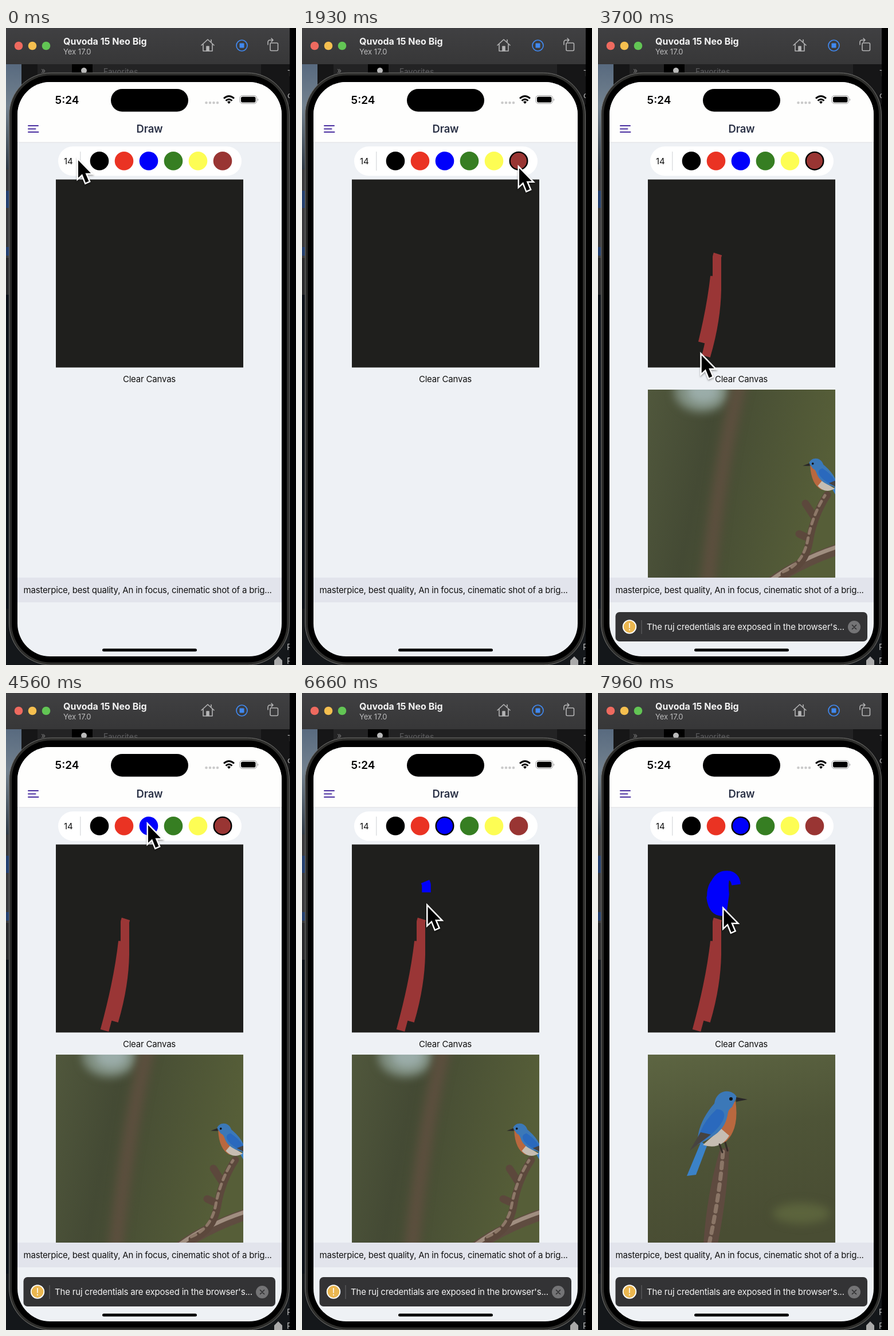
Write an HTML page that moves like this. It is 506x1108 px and loops after 8 s.

```html
<!DOCTYPE html>
<html lang="en">
<head>
<meta charset="utf-8">
<title>Draw</title>
<style>
  html, body { margin: 0; width: 100%; height: 100%; overflow: hidden; background: #000; }
  svg { display: block; width: 506px; height: 1108px; }
  text { font-family: Inter, Roboto, sans-serif; }
  .ui { font-size: 15px; letter-spacing: -.19px; fill: #111; }
  .mid { text-anchor: middle; }
  .line { fill: none; stroke-linecap: round; stroke-linejoin: round; }
  .pen { fill: none; stroke-linejoin: bevel; }
  .soft { filter: blur(8px); }
  #cursor { filter: drop-shadow(0 2px 1.5px rgba(0, 0, 0, .35)); }
</style>
</head>
<body>
<svg viewBox="0 0 506 1108">
  <defs>
    <linearGradient id="bar" x2="0" y2="1">
      <stop stop-color="#404042"/><stop offset="1" stop-color="#373738"/>
    </linearGradient>
    <linearGradient id="sky" x2="0" y2="1">
      <stop stop-color="#586a7f"/><stop offset=".4" stop-color="#73828f"/><stop offset="1" stop-color="#2f3944"/>
    </linearGradient>
    <linearGradient id="grove" x2="1" y2=".2">
      <stop stop-color="#50573c"/><stop offset=".35" stop-color="#444a34"/><stop offset="1" stop-color="#565e38"/>
    </linearGradient>
    <linearGradient id="meadow" x2=".2" y2="1">
      <stop stop-color="#5d6542"/><stop offset=".5" stop-color="#4e5437"/><stop offset="1" stop-color="#494d33"/>
    </linearGradient>
    <clipPath id="screen"><rect x="20" y="94" width="461" height="999" rx="57"/></clipPath>
    <clipPath id="board"><rect x="87" y="264" width="327" height="326"/></clipPath>
    <clipPath id="photo"><rect x="87" y="629" width="327" height="327"/></clipPath>

    <!-- bird facing right, centred on its head -->
    <g id="bird">
      <path d="M-45 74L-35 82L-54 132L-70 134Z" fill="#3b82c8"/>
      <path d="M15 4Q22 55-4 76H-30L5 10Z" fill="#b9683f"/>
      <path d="M4 64Q-12 90-42 80L-10 52Z" fill="#c6bdb2"/>
      <path d="M-22 8C-18-18 10-18 17-3L9 14Q2 18 1 28C-4 56-24 66-52 80Q-52 42-22 8Z" fill="#3b78b8"/>
      <path d="M-18 18C4 18 2 45-52 80Q-48 45-18 18Z" fill="#2a69bd"/>
      <path d="M-65 90L-46 58L-28 62Z" fill="#474340"/>
      <path d="M16-3L36 1L16 5Z" fill="#292728"/>
      <circle cx="7" r="3" fill="#101216"/>
    </g>
  </defs>

  <!-- desktop behind the phone -->
  <rect width="506" height="1108" fill="#050607"/>
  <rect y="63" width="27" height="183" fill="url(#sky)"/>
  <rect x="27" y="63" width="468" height="70" fill="#161617"/>
  <rect x="55" y="63" width="390" height="20" fill="#232324"/>
  <rect x="115" y="63" width="36" height="20" fill="#000"/>
  <circle cx="136" cy="74" r="5" fill="#bbb"/>
  <text x="61" y="79" font-size="14" fill="#777">»</text>
  <text x="170" y="81" font-size="14" fill="#5e5e60">Favorites</text>
  <rect y="246" width="6" height="154" fill="#3a3a3c"/>
  <path d="M0 283H6V313H0ZM0 381H6V396H0Z" fill="#24406f"/>
  <rect y="400" width="6" height="64" fill="#29292b"/>
  <rect y="464" width="6" height="546" fill="#0b1017"/>
  <path d="M0 1010H495V1108H0Z" fill="#14171a"/>
  <g font-size="14" fill="#bbb">
    <text x="491" y="84">T</text><text x="491" y="122">c</text>
    <text x="490" y="1082">P</text><text x="490" y="1106">P</text>
  </g>
  <path d="M468 1100L475 1093L482 1100V1108H468Z" fill="#aaa"/>
  <rect x="495" width="11" height="1108" fill="#000"/>

  <!-- simulator title bar -->
  <rect width="495" height="63" fill="url(#bar)"/>
  <circle cx="22" cy="31" r="7.3" fill="#ee6a5f"/>
  <circle cx="46" cy="31" r="7.3" fill="#f5bf4f"/>
  <circle cx="70" cy="31" r="7.3" fill="#62c554"/>
  <text x="100" y="29" font-size="16" font-weight="700" fill="#f3f3f3">Quvoda 15 Neo Big</text>
  <text x="100" y="46" font-size="13" fill="#bdbdbe">Yex 17.0</text>
  <g class="line" stroke="#b4b4b5" stroke-width="1.6">
    <path d="M341 30L352 20L363 30M344 28V40H360V28M358 24V20.5"/>
    <path d="M350 40V32H354V40" fill="#b4b4b5"/>
    <rect x="461" y="26" width="13.5" height="13.5" rx="2"/>
    <path d="M457 29V25Q457 21 461 21H466M463 18L466 21L463 24"/>
  </g>
  <circle cx="411.5" cy="30.5" r="9.5" fill="none" stroke="#4189f0" stroke-width="1.7"/>
  <rect x="407.5" y="26.5" width="8" height="8" rx="1" fill="#4189f0"/>

  <!-- phone body -->
  <rect x="5.5" y="78" width="489" height="1030" rx="73" fill="#2d2d2b" stroke="#737371"/>
  <rect x="10" y="82.5" width="480" height="1021" rx="68" fill="#000"/>

  <g clip-path="url(#screen)">
    <rect x="20" y="94" width="461" height="999" fill="#eef1f5"/>
    <rect x="20" y="94" width="461" height="105" fill="#fefefd"/>
    <rect x="20" y="198.5" width="461" height="1" fill="#dfe0e2"/>
    <text class="mid" x="106.5" y="132" font-size="19" font-weight="600">5:24</text>
    <rect x="183" y="106" width="135" height="39.5" rx="19.7" fill="#000"/>
    <path class="line" d="M349.5 130H370" stroke="#cbcbcb" stroke-width="4.6" stroke-dasharray="0 6.5"/>
    <path d="M380 122.5Q389 114.5 398 122.5M383.5 126.5Q389 121.5 394.5 126.5" fill="none" stroke="#000" stroke-width="3"/>
    <path d="M386 128.5Q389 126 392 128.5L389 132Z"/>
    <rect x="408" y="117.5" width="29.5" height="14" rx="4.5" fill="none" stroke="#9b9b9b"/>
    <rect x="410" y="119.5" width="25.5" height="10" rx="2.8"/>
    <path d="M439 122.5Q441.5 124.5 439 127Z" fill="#9b9b9b"/>
    <path class="line" d="M39 170H56M39 175.5H51.5M39 181H56.5" stroke="#4a2fa0" stroke-width="2"/>
    <text class="mid" x="250.5" y="182" font-size="18.5" font-weight="600" letter-spacing="-.2" fill="#2a3146">Draw</text>

    <rect x="91" y="206" width="320" height="51" rx="25.5" fill="#fff"/>
    <text class="ui" x="101" y="236.5">14</text>
    <rect x="129" y="215" width="1.5" height="33" fill="#dedfe1"/>
    <g id="swatches"></g>

    <rect x="87" y="263.5" width="327" height="327" fill="#1f1f1d"/>
    <g clip-path="url(#board)">
      <path class="pen" id="trunk" pathLength="1" stroke="#9a3636" stroke-width="15"
        d="M209 393L207.5 398V455Q206.5 510 188.5 571Q206 505 203.5 432Q196 500 172 587"/>
      <path class="pen" id="head" pathLength="1" stroke="#0000fb" stroke-width="15.5"
        d="M215 328L217 333V378A19 27 0 0 1 205 330Q212 316 226 317T241 333Q238 317 226 317Q218 320 221 350L217 380Q200 380 197 355Q210 335 211 350L217 371"/>
    </g>
    <text class="ui mid" x="250" y="615.5">Clear Canvas</text>

    <g id="edgeBird" clip-path="url(#photo)">
      <rect x="87" y="629" width="327" height="327" fill="url(#grove)"/>
      <ellipse class="soft" cx="181" cy="632" rx="48" ry="36" fill="#7f8e80"/>
      <ellipse class="soft" cx="184" cy="632" rx="28" ry="20" fill="#9bada9"/>
      <path class="pen soft" d="M250 610Q215 740 190 980" stroke="#5c4f3e" stroke-width="25"/>
      <g class="line">
        <path d="M300 966Q350 930 418 907" stroke="#5f4c40" stroke-width="19"/>
        <path d="M302 960Q350 925 416 903" stroke="#a08e80" stroke-width="7"/>
        <path d="M325 950Q362 935 369 892T400 812M362 885L351 880M377 850L362 827" stroke="#5c483c" stroke-width="13"/>
        <path d="M323 946Q358 932 366 890T396 813" stroke="#8d7868" stroke-width="5" stroke-dasharray="9 8"/>
      </g>
      <use href="#bird" transform="translate(379 757) scale(-.62 .62) rotate(10)"/>
    </g>

    <g id="perchBird" clip-path="url(#photo)">
      <rect x="87" y="629" width="327" height="327" fill="url(#meadow)"/>
      <ellipse class="soft" cx="355" cy="905" rx="50" ry="18" fill="#5c643d"/>
      <path d="M213 793L229 790Q227 865 209 958H184Q190 870 213 793Z" fill="#5e4a3f"/>
      <path class="line" d="M218 798Q213 870 194 958" stroke="#8a7566" stroke-width="7" stroke-dasharray="10 9"/>
      <use href="#bird" x="225" y="706"/>
      <path class="line" d="M212 785L217 799M222 782L226 796" stroke="#352c28" stroke-width="3"/>
    </g>

    <rect x="20" y="956" width="461" height="43" fill="#e2e4ec"/>
    <text class="ui" x="30.5" y="983">masterpice, best quality, An in focus, cinematic shot of a brig...</text>

    <g id="toast">
      <rect x="30.5" y="1016" width="439.5" height="51" rx="7" fill="#333335"/>
      <circle cx="55" cy="1041.5" r="11.3" fill="#ebb750" stroke="#fff" stroke-width="1.8"/>
      <text class="mid" x="55" y="1047.5" font-size="17" fill="#fff">!</text>
      <rect x="75.5" y="1030" width="1" height="24" fill="#68686a"/>
      <text class="ui" x="85" y="1047" style="fill:#f4f4f4">The ruj credentials are exposed in the browser's...</text>
      <circle cx="447" cy="1042" r="11" fill="#747476"/>
      <path class="line" d="M443.5 1038.5l7 7m0-7l-7 7" stroke="#2f2f31" stroke-width="1.7"/>
    </g>
    <rect x="168" y="1079.5" width="165" height="5" rx="2.5"/>
  </g>

  <path id="cursor" d="M2.5 6V36.5L9.5 30L15.5 45L21 42.5L15 28.5H24.5Z" stroke="#fff" stroke-width="5" paint-order="stroke"/>
</svg>

<script>
const LOOP = 8000;
const $ = id => document.getElementById(id);
const clamp = k => Math.min(1, Math.max(0, k));
const linear = k => k;
const smooth = k => k * k * (3 - 2 * k);

function make(tag, attrs) {
  const node = document.createElementNS("http://www.w3.org/2000/svg", tag);
  for (const name in attrs) node.setAttribute(name, attrs[name]);
  return node;
}

const glide = (from, to, d) => ({ from, to, ease: smooth, path: make("path", { d }) });
const stroke = (from, to, id, lag) => ({ from, to, lag, ease: linear, path: $(id) });

// the pointer rests at the end of each move until the next one begins
const trunk = stroke(2600, 3760, "trunk", 40);
const head = stroke(6500, 7900, "head", 80);
const moves = [
  glide(25, 100, "M123.5 224L234 377"),
  glide(260, 1030, "M234 377C290 330 350 168 376.5 238"),
  glide(2060, 2560, "M376.5 238Q300 330 209 393"),
  trunk,
  glide(4050, 4560, "M172 587Q200 330 245.5 224"),
  glide(4850, 5530, "M245.5 224Q246 320 264 382"),
  glide(5840, 6360, "M264 382Q262 415 215 328"),
  head
];

const swatches = ["#000", "#ea3323", "#0000fb", "#367e22", "#fdfd54", "#993533"].map((fill, i) =>
  $("swatches").appendChild(make("circle", { cx: 163 + 43 * i, cy: 231.2, fill, "stroke-width": 2.4 })));

const progress = (move, t) => move.ease(clamp((t - move.from) / (move.to - move.from)));

function point(t) {
  const move = moves.findLast(m => m.from <= t) || moves[0];
  return move.path.getPointAtLength(progress(move, t) * move.path.getTotalLength());
}

function paint(move, t) {
  const k = progress(move, t - move.lag);
  move.path.style.display = k > 0 ? "" : "none";
  move.path.setAttribute("stroke-dasharray", `${k} 2`);
}

function show(id, on) { $(id).style.display = on ? "" : "none"; }

function select(picked) {
  swatches.forEach((dot, i) => {
    dot.setAttribute("r", i === picked ? 15.3 : 16.3);
    dot.setAttribute("stroke", i === picked ? "#000" : "none");
  });
}

function draw(t) {
  const { x, y } = point(t);
  $("cursor").setAttribute("transform", `translate(${x} ${y})`);
  paint(trunk, t);
  paint(head, t);
  select(t < 1930 ? -1 : t < 4730 ? 5 : 2);
  show("toast", t >= 2660);
  show("edgeBird", t >= 3330 && t < 6960);
  show("perchBird", t >= 6960);
}

const start = performance.now();
function tick() {
  draw((performance.now() - start) % LOOP);
  requestAnimationFrame(tick);
}
tick();
</script>
</body>
</html>
```
